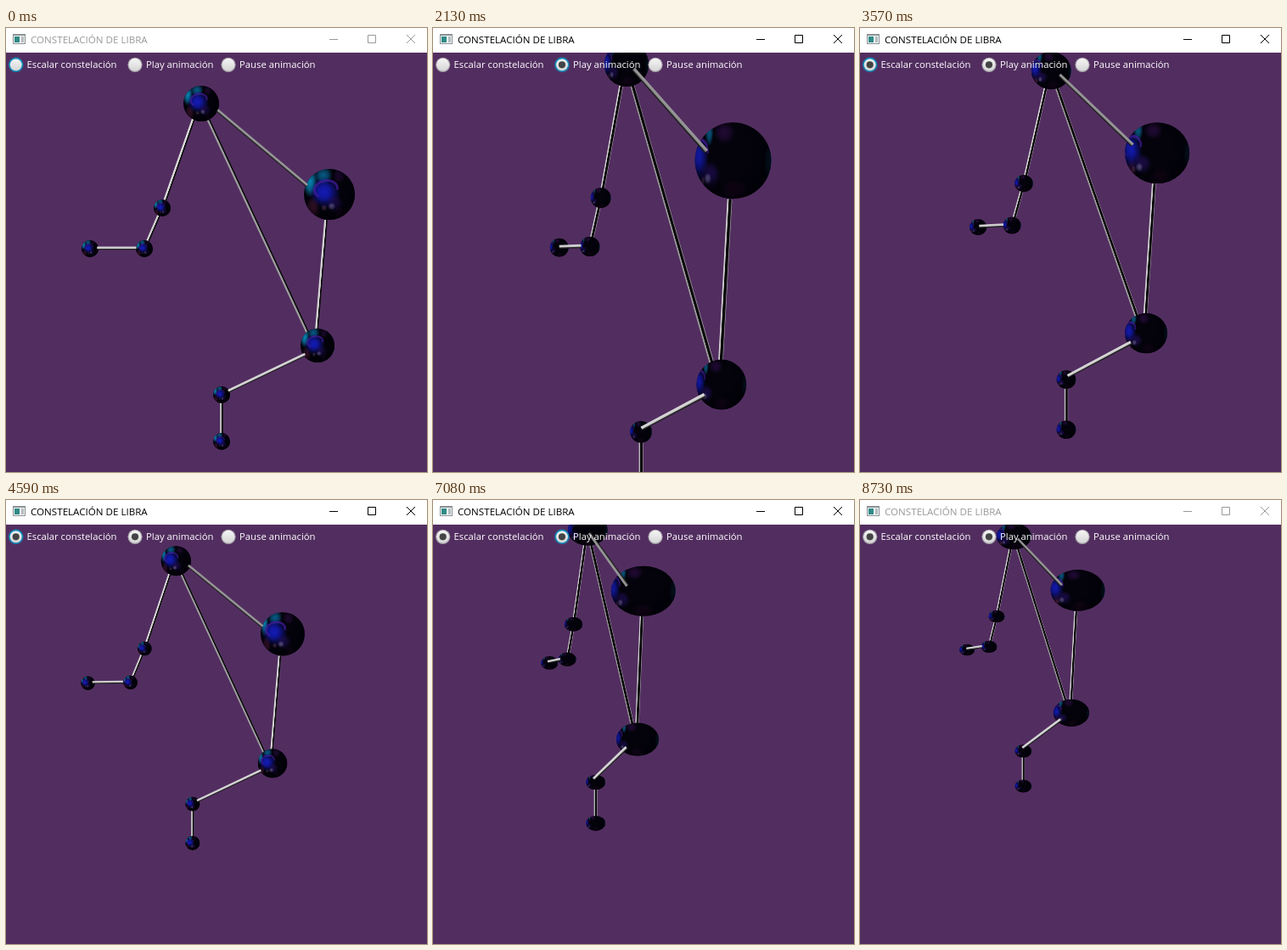
Write an HTML page with a canvas that moves like this. It is 496 by 523 pixels and loops after 8.76 s.

```html
<!DOCTYPE html>
<html lang="es">
<head>
<meta charset="utf-8">
<style>
  html, body { margin: 0; width: 100%; height: 100%; overflow: hidden; background: #522e60; }
  canvas { display: block; }
</style>
</head>
<body>
<canvas id="stage" width="496" height="523"></canvas>
<script>
const ctx = document.getElementById('stage').getContext('2d');
const LOOP = 8760, STEP = 30;
const TOP = 29, CX = 248, CY = 276, EYE = 922;
const PIVOT_X = 56, PIVOT_Z = 93, SWING = 60;
const TAU = Math.PI * 2;

// Stars: x, y, radius
const stars = [
  [230, 89, 21], [381, 196, 30], [367, 374, 20], [184, 212, 10],
  [163, 260, 10], [99, 260, 10], [254, 432, 10], [254, 487, 10]
];

// Bars: x1, y1, x2, y2, depth offset, grey level
const backBars = [
  [238, 107, 355, 358, 0, 165], [377, 226, 366, 356, 0, 222],
  [221, 107, 187, 204, 0, 230], [180, 221, 167, 251, 0, 220],
  [254, 441, 254, 478, 0, 200]
];
const frontBars = [
  [249, 98, 354, 186, 5, 155], [352, 384, 262, 427, 5, 222],
  [108, 259.5, 154, 259.5, 5, 215]
];

// Surface patches: longitude, latitude (deg), size, colour, alpha
const patches = [
  [-62, -30, 0.62, '8,140,190', 0.95],
  [-22, -50, 0.4, '8,120,175', 0.75],
  [-55, 36, 0.5, '92,28,62', 0.75],
  [-10, -4, 0.62, '16,20,150', 1],
  [-14, -6, 0.4, '20,28,185', 0.8],
  [14, 22, 0.36, '34,14,92', 0.8],
  [6, 28, 0.15, '150,140,200', 0.6],
  [-14, 32, 0.13, '150,90,150', 0.45],
  [35, -48, 0.3, '62,16,92', 0.5],
  [140, 5, 0.62, '8,62,92', 0.85],
  [60, 62, 0.4, '62,12,60', 0.5]
];

// Swing phase over time; each unit is one sweep
const phaseKeys = [
  [940, 0], [1170, 0.224], [2130, 1.163], [3570, 2.7], [4590, 3.753],
  [5130, 4.336], [6480, 4.336], [7080, 4.97], [8730, 6.74], [8760, 6.77]
];
const shrinkTimes = [3480, 4020, 5970, 7230];

function phaseAt(t) {
  if (t <= phaseKeys[0][0]) return 0;
  const i = phaseKeys.findIndex(k => k[0] >= t);
  const [t0, p0] = phaseKeys[i - 1], [t1, p1] = phaseKeys[i];
  return p0 + (p1 - p0) * (t - t0) / (t1 - t0);
}

function easeBoth(u) {
  if (u < 0.2) return 3.125 * u * u;
  if (u > 0.8) return 1 - 3.125 * (1 - u) * (1 - u);
  return 1.25 * u - 0.125;
}

function poseAt(t) {
  const phase = phaseAt(t) % 2;
  const deg = SWING * easeBoth(phase > 1 ? 2 - phase : phase);
  const a = deg * Math.PI / 180;
  const scale = Math.pow(0.9, shrinkTimes.filter(s => t >= s).length);
  return { deg, scale, sin: Math.sin(a), cos: Math.cos(a) };
}

function project(x, y, lift, pose) {
  const { sin, cos, scale } = pose;
  const dx = x * scale - PIVOT_X;
  const near = dx * sin + PIVOT_Z * (1 - cos) + lift * cos;
  const px = PIVOT_X + dx * cos + (PIVOT_Z - lift) * sin;
  const zoom = EYE / (EYE - near);
  return {
    x: CX + (px - CX) * zoom,
    y: CY + (TOP + (y - TOP) * scale - CY) * zoom,
    zoom
  };
}

function softDot(color, alpha) {
  const g = ctx.createRadialGradient(0, 0, 0, 0, 0, 1);
  g.addColorStop(0, `rgba(${color},${alpha})`);
  g.addColorStop(0.5, `rgba(${color},${alpha * 0.7})`);
  g.addColorStop(1, `rgba(${color},0)`);
  return g;
}

function onSurface(lon, lat, size, turn, paint) {
  const l = (lon - turn) * Math.PI / 180, b = lat * Math.PI / 180;
  const face = Math.cos(l);
  if (face < -0.25) return;
  ctx.save();
  ctx.translate(Math.sin(l) * Math.cos(b), Math.sin(b));
  ctx.scale(size * Math.max(0.28, face), size);
  paint();
  ctx.restore();
}

function drawStar([x, y, r], pose) {
  const p = project(x, y, 0, pose);
  const ry = r * pose.scale * p.zoom;
  const rx = r * Math.hypot(pose.scale * pose.cos, pose.sin) * p.zoom;
  ctx.save();
  ctx.translate(p.x, p.y);
  ctx.scale(rx, ry);
  ctx.beginPath();
  ctx.arc(0, 0, 1, 0, TAU);
  ctx.fillStyle = '#04030c';
  ctx.fill();
  ctx.clip();
  for (const [lon, lat, size, color, alpha] of patches) {
    onSurface(lon, lat, size, pose.deg, () => {
      ctx.fillStyle = softDot(color, alpha);
      ctx.fillRect(-1, -1, 2, 2);
    });
  }
  onSurface(-8, -12, 0.46, pose.deg, () => {
    ctx.beginPath();
    ctx.ellipse(0, 0, 1, 0.72, -0.2, 2.4, 6.6);
    ctx.strokeStyle = 'rgba(72,28,160,0.7)';
    ctx.lineWidth = 0.2;
    ctx.stroke();
  });
  const shade = ctx.createRadialGradient(-0.25, -0.25, 0.55, -0.25, -0.25, 1.3);
  shade.addColorStop(0, 'rgba(0,0,6,0)');
  shade.addColorStop(1, 'rgba(0,0,6,0.8)');
  ctx.fillStyle = shade;
  ctx.fillRect(-1, -1, 2, 2);
  ctx.restore();
}

function drawBar([x1, y1, x2, y2, lift, level], pose) {
  const a = project(x1, y1, lift, pose), b = project(x2, y2, lift, pose);
  const len = Math.hypot(b.x - a.x, b.y - a.y) || 1;
  let nx = (b.y - a.y) / len, ny = -(b.x - a.x) / len;
  // Normal points to the lit side
  if (nx + ny * 1.2 > 0) { nx = -nx; ny = -ny; }
  const base = 1.9 * Math.sqrt(pose.scale);
  const wa = base * a.zoom, wb = base * b.zoom, w = (wa + wb) / 2;
  const mx = (a.x + b.x) / 2, my = (a.y + b.y) / 2;
  const g = ctx.createLinearGradient(mx + nx * w, my + ny * w, mx - nx * w, my - ny * w);
  const turn = pose.deg / SWING;
  const grey = v => `rgb(${v},${v},${v})`;
  if (lift) {
    g.addColorStop(0, grey(level));
    g.addColorStop(0.55, grey(level * 0.92));
    g.addColorStop(0.78, grey(40));
    g.addColorStop(1, grey(25));
  } else {
    const edge = 0.52 - 0.3 * turn;
    g.addColorStop(0, grey(level));
    g.addColorStop(edge, grey(level * 0.9));
    g.addColorStop(edge + 0.12, grey(8));
    g.addColorStop(0.8, grey(8));
    g.addColorStop(1, grey(25 + 155 * Math.min(1, turn * 1.2)));
  }
  ctx.fillStyle = g;
  ctx.beginPath();
  ctx.moveTo(a.x + nx * wa, a.y + ny * wa);
  ctx.lineTo(b.x + nx * wb, b.y + ny * wb);
  ctx.lineTo(b.x - nx * wb, b.y - ny * wb);
  ctx.lineTo(a.x - nx * wa, a.y - ny * wa);
  ctx.fill();
}

function disc(x, y, r, fill) {
  ctx.beginPath();
  ctx.arc(x, y, r, 0, TAU);
  ctx.fillStyle = fill;
  ctx.fill();
}

function drawRadio(x, label, textX, on, focused) {
  const y = 43.3;
  if (focused) {
    disc(x, y, 9, 'rgba(3,158,211,0.4)');
    disc(x, y, 8.2, '#1597c2');
  } else {
    disc(x, y, 8.6, '#a5a0a8');
  }
  const g = ctx.createLinearGradient(0, y - 7, 0, y + 7);
  g.addColorStop(0, '#f4f4f4');
  g.addColorStop(1, '#d6d6d6');
  disc(x, y, focused ? 6.9 : 7.5, g);
  if (on) disc(x, y, 4.1, '#444');
  ctx.fillStyle = '#fff';
  ctx.font = '11.3px "Open Sans", "Noto Sans", sans-serif';
  ctx.fillText(label, textX, 47);
}

function drawControls(t) {
  const between = (a, b) => t >= a && t < b;
  const playing = between(930, 5130) || t >= 6450;
  const scaleFocus = t < 930 || between(3360, 5010) || between(5850, 6450) || between(7140, 8700);
  const playFocus = between(930, 3360) || between(6450, 7140);
  drawRadio(11.7, 'Escalar constelación', 24.5, t >= 3480, scaleFocus);
  drawRadio(152, 'Play animación', 165, playing, playFocus);
  drawRadio(262, 'Pause animación', 275, between(5130, 6450), between(5010, 5850));
}

function drawTitleBar(active) {
  ctx.fillStyle = '#fff';
  ctx.fillRect(0, 0, 496, TOP);

  ctx.fillStyle = '#8a9094';
  ctx.fillRect(8, 7, 15, 12);
  ctx.fillStyle = '#f2f5f5';
  ctx.fillRect(9, 9, 13, 9);
  ctx.fillStyle = '#2f8a86';
  ctx.fillRect(10, 10, 6, 7);
  ctx.fillStyle = '#b4bcc0';
  ctx.fillRect(18, 10, 3, 7);

  const ink = active ? '#000' : '#999';
  ctx.fillStyle = ink;
  ctx.font = '11.6px "Open Sans", "Noto Sans", sans-serif';
  ctx.fillText('CONSTELACIÓN DE LIBRA', 29, 17.8);
  ctx.strokeStyle = ink;
  ctx.lineWidth = 1;
  ctx.beginPath();
  ctx.moveTo(381, 13.5);
  ctx.lineTo(391, 13.5);
  ctx.rect(426.5, 8.5, 9, 9);
  ctx.moveTo(472, 8);
  ctx.lineTo(482, 18);
  ctx.moveTo(482, 8);
  ctx.lineTo(472, 18);
  ctx.stroke();
}

function draw(t) {
  const pose = poseAt(t);
  ctx.fillStyle = '#522e60';
  ctx.fillRect(0, 0, 496, 523);
  backBars.forEach(b => drawBar(b, pose));
  stars.forEach(s => drawStar(s, pose));
  frontBars.forEach(b => drawBar(b, pose));
  drawControls(t);
  drawTitleBar(t >= 390 && t < 8700);
}

const start = performance.now();
function tick() {
  const t = (performance.now() - start) % LOOP;
  draw(Math.floor(t / STEP) * STEP);
  requestAnimationFrame(tick);
}
tick();
</script>
</body>
</html>
```
